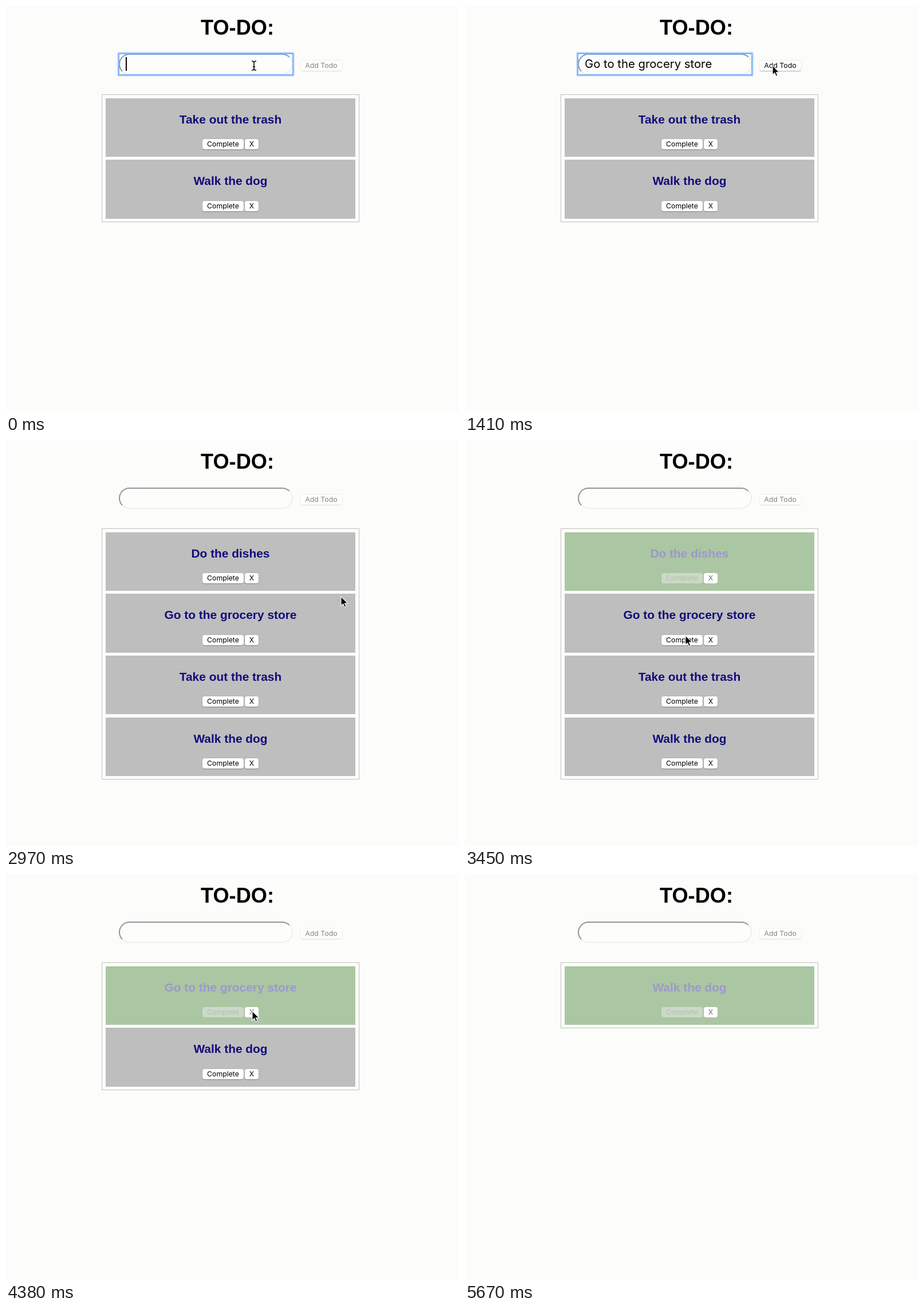
Write an HTML page that moves like this. It is 791x708 px and loops after 5.7 s.

```html
<!DOCTYPE html>
<html lang="en">
<head>
<meta charset="utf-8">
<title>To-do</title>
<style>
html, body { margin: 0; width: 100%; height: 100%; overflow: hidden; background: #fcfdfb; }
body * { position: absolute; box-sizing: border-box; margin: 0; white-space: pre; }
h1, h2 { font-family: "Liberation Sans", Arial, sans-serif; font-weight: bold; }
h1 { left: 340px; top: 18px; font-size: 36.2px; line-height: 40px; color: #000; }
h2 { left: 0; top: 25px; width: 436px; font-size: 20.9px; line-height: 24px; text-align: center; color: #120c7a; }
#ring { left: 196px; top: 82px; width: 306px; height: 39px; border: 2px solid #80b0f5; box-shadow: 0 0 2px 1px #92bffa; }
#field { left: 197px; top: 83px; width: 304px; height: 37px; border: 2px solid; border-color: #949494 #eee #eee #949494; border-radius: 19px; background: #fdfefc; }
.focus #field { border-top-color: #7297cf; }
#typed { left: 209px; top: 86px; height: 30px; font: 20.3px/30px Inter, sans-serif; color: #000; }
#text { position: static; }
#caret { left: 100%; top: 3px; width: 1.5px; height: 24px; background: #000; }
.btn { height: 18px; border-radius: 4px; background: #fff; color: #000; font: 12.3px/18px Inter, sans-serif; text-align: center; box-shadow: 0 0 0 .5px rgba(0,0,0,.13), 0 1px 1px rgba(0,0,0,.28); }
#add { left: 514px; top: 95px; width: 73px; }
#add.off { color: #858585; background: #fefefd; box-shadow: 0 0 0 .5px rgba(0,0,0,.1), 0 1px 1px rgba(0,0,0,.08); }
.btn.down { background: linear-gradient(#6aaefa, #1b6af4); }
#list { left: 167px; top: 154px; width: 450px; border: 1px solid #c0c0b8; background: #fdfdfc; }
.row { left: 174px; width: 436px; height: 102.3px; background: #bebebe; }
.ok { left: 169px; top: 71.4px; width: 72px; }
.del { left: 243px; top: 71.4px; width: 24px; }
.done { background: #abc6a2; }
.done h2 { color: #9d98ca; }
.done .btn { box-shadow: none; color: #6c6c6c; }
.done .ok { background: #cbd9c6; color: #b1c2ab; }
#cursor { left: 0; top: 0; width: 1px; height: 1px; overflow: visible; }
</style>
</head>
<body>
<h1>TO-DO:</h1>
<div id="field"></div>
<div id="ring"></div>
<div id="typed"><span id="text"></span><i id="caret"></i></div>
<div id="add" class="btn">Add Todo</div>
<div id="list"></div>
<svg id="cursor">
  <path id="arrow" d="M0 0V16.2L3.7 12.7L6.2 18.4L8.8 17.3L6.4 11.7H11.6Z" fill="#000" stroke="#fff" stroke-width="1.1"/>
  <path id="beam" d="M-4-8Q0-8 0-5Q0-8 4-8M0-5V5M-4 8Q0 8 0 5Q0 8 4 8M-2 2H2" fill="none" stroke="#000" stroke-width="1.5"/>
</svg>
<script>
const LOOP = 5700, PRESS = 70, TRAVEL = 180, REST = 90;
const CHAR_MS = 45, THINK = 70;
const PITCH = 107.7, ROWS = 4;
const $ = id => document.getElementById(id);

// Each step ends with the pointer at a spot, where it may click.
const focus = time => ({ time, act: "focus", at: [433, 104] });
const add = (time, name) => ({ time, act: "add", name, at: [537, 104] });
const complete = (time, row) => ({ time, act: "ok", row, at: [385, 241 + PITCH * row] });
const remove = (time, row) => ({ time, act: "del", row, at: [430, 239 + PITCH * row] });
const roam = (time, x, y) => ({ time, at: [x, y] });

const steps = [
  focus(0), add(1500, "Go to the grocery store"),
  focus(1680), add(2580, "Do the dishes"),
  roam(2780, 708, 200), roam(2970, 585, 273),
  complete(3300, 0), complete(3570, 1),
  remove(4020, 2), remove(4380, 0), remove(4560, 0),
  roam(4740, 424, 334), roam(4950, 405, 258),
  complete(5100, 0), roam(5520, 752, -25)
];

const rows = Array.from({ length: ROWS }, (_, i) => {
  const el = document.createElement("div");
  el.className = "row";
  el.style.top = 160.6 + PITCH * i + "px";
  el.innerHTML = '<h2></h2><div class="btn ok">Complete</div><div class="btn del">X</div>';
  document.body.insertBefore(el, $("cursor"));
  const [title, ok, del] = el.children;
  return { el, title, ok, del };
});

const show = (el, on) => el.style.display = on ? "" : "none";

function tasksAfter(past) {
  const tasks = [{ name: "Take out the trash" }, { name: "Walk the dog" }];
  for (const { act, row, name } of past) {
    if (act === "add") tasks.unshift({ name });
    if (act === "ok") tasks[row].done = true;
    if (act === "del") tasks.splice(row, 1);
  }
  return tasks;
}

function drawTasks(tasks) {
  rows.forEach(({ el, title }, i) => {
    const task = tasks[i];
    show(el, task);
    if (!task) return;
    title.textContent = task.name;
    el.classList.toggle("done", !!task.done);
  });
  $("list").style.height = Math.round(7.4 + PITCH * tasks.length) + "px";
}

function drawPress(t, next) {
  document.querySelectorAll(".down").forEach(el => el.classList.remove("down"));
  if (!next || !next.act || next.time - t > PRESS) return;
  const button = next.act === "add" ? $("add") : next.act !== "focus" && rows[next.row][next.act];
  if (button) button.classList.add("down");
}

// Returns whether typing hides the pointer.
function drawEntry(t, last, next) {
  const editing = last.act === "focus";
  const name = editing ? next.name : "";
  const count = Math.max(0, Math.floor((t - last.time - THINK) / CHAR_MS));
  const focused = editing && next.time - t > PRESS;
  $("text").textContent = name.slice(0, count);
  $("add").classList.toggle("off", !editing || !count);
  document.body.classList.toggle("focus", focused);
  show($("ring"), focused);
  show($("caret"), focused && count < name.length + 4);
  return editing && count > 0 && count <= name.length;
}

function drawPointer(t, last, next, hidden) {
  let [x, y] = last.at;
  if (next) {
    const arrive = next.time - REST;
    const leave = Math.max(last.time, arrive - TRAVEL);
    const k = Math.min(1, Math.max(0, (t - leave) / (arrive - leave)));
    const ease = k * k * (3 - 2 * k);
    x += (next.at[0] - x) * ease;
    y += (next.at[1] - y) * ease;
  }
  const overField = x > 197 && x < 501 && y > 83 && y < 120;
  $("cursor").style.transform = `translate(${x}px, ${y}px)`;
  show($("cursor"), !hidden);
  show($("beam"), overField);
  show($("arrow"), !overField);
}

const begin = performance.now();
function frame() {
  const t = (performance.now() - begin) % LOOP;
  const past = steps.filter(s => s.time <= t);
  const last = past[past.length - 1], next = steps[past.length];
  drawTasks(tasksAfter(past));
  drawPress(t, next);
  drawPointer(t, last, next, drawEntry(t, last, next));
  requestAnimationFrame(frame);
}
frame();
</script>
</body>
</html>
```
